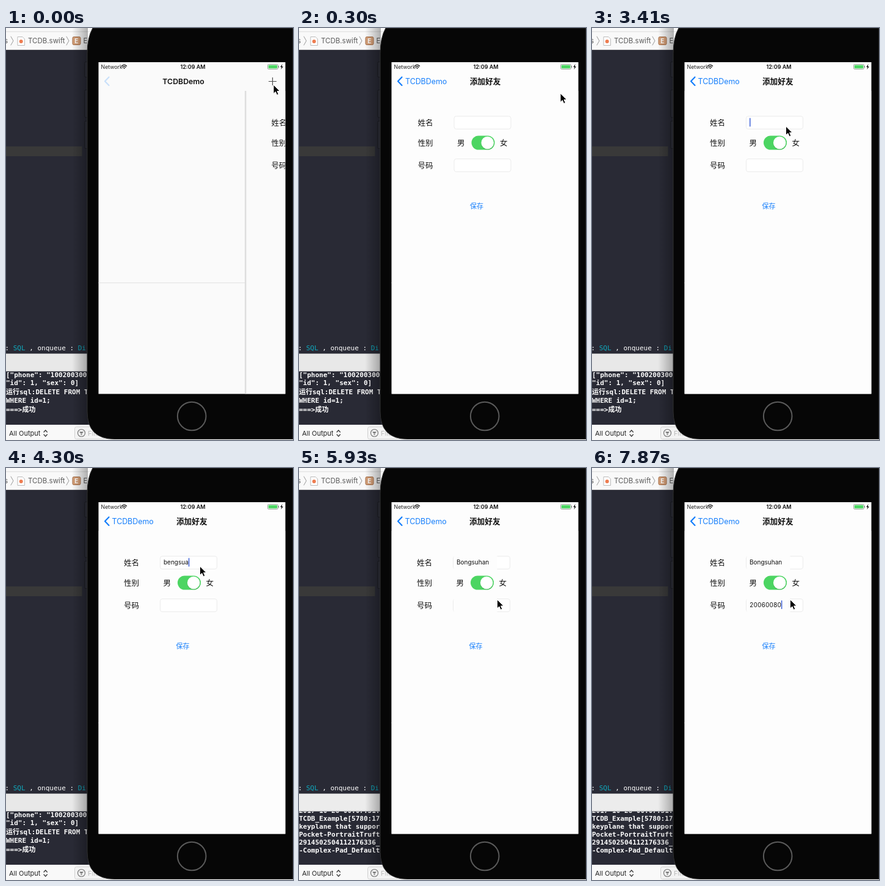
Write an HTML page that moves like this. It is 470 px wide and 675 px high and loops after 8 s.

```html
<!DOCTYPE html>
<html lang="zh-CN">
<head>
<meta charset="utf-8">
<title>Add friend form</title>
<style>
  html, body { margin: 0; width: 100%; height: 100%; overflow: hidden; background: #292a35; }
  svg { display: block; width: 470px; height: 675px; }
  text { font-family: Inter, "Noto Sans CJK SC", "Noto Sans CJK", sans-serif; white-space: pre; }
  .mono { font: 11px "DejaVu Sans Mono", "Noto Sans CJK SC", "Noto Sans CJK", monospace; fill: #fff; }
  .log text { font-weight: 700; }
  .cyan { fill: #10a9bd; }
  .label { font-size: 12.5px; fill: #111; }
  .title { font-size: 12.3px; font-weight: 600; fill: #111; }
  .input { font-size: 10px; fill: #111; font-variant-numeric: tabular-nums; }
  .crumb { font-size: 11.5px; fill: #5c5c5c; }
  .blue { fill: #157efb; }
  .line { fill: none; stroke-linecap: round; stroke-linejoin: round; }
</style>
</head>
<body>
<svg viewBox="0 0 470 675">
  <defs>
    <linearGradient id="shade">
      <stop offset="0" stop-opacity="0"/>
      <stop offset=".45" stop-opacity=".13"/>
      <stop offset="1" stop-opacity=".3"/>
    </linearGradient>
    <clipPath id="screen"><rect x="151.5" y="56" width="306" height="543.5"/></clipPath>
    <clipPath id="content"><rect x="151.5" y="103" width="306" height="496.5"/></clipPath>
    <clipPath id="console"><rect y="563" width="140" height="87"/></clipPath>
  </defs>

  <!-- editor window -->
  <rect width="470" height="675" fill="#292a35"/>
  <rect width="160" height="36" fill="#f9f9f9"/>
  <rect y="5.5" width="160" height="1" fill="#dcdcdc"/>
  <rect y="35" width="160" height="1" fill="#cfcfcf"/>
  <text class="crumb" x="-3" y="25">s</text>
  <path class="line" d="M8 14l4 7-4 7M99 14l4 7-4 7" stroke="#999"/>
  <path d="M19 14.500h8l3.500 3.500v10.500h-11.500z" fill="#fff" stroke="#bbb"/>
  <circle cx="24.700" cy="22" r="3" fill="#ee7c50"/>
  <text class="crumb" x="36" y="25">TCDB.swift</text>
  <rect x="109" y="14.500" width="13" height="13" rx="2" fill="#d5a079" stroke="#a9734e"/>
  <text x="112.300" y="25" font-size="10" font-weight="700" fill="#fff">E</text>
  <text class="crumb" x="126.500" y="25">E</text>
  <rect y="194" width="124.500" height="16" fill="#393939"/>
  <text class="mono" x="-1.500" y="528">: <tspan class="cyan">SQL</tspan> , onqueue : <tspan class="cyan">Di</tspan></text>
  <rect id="bar" y="533.500" width="160" height="29"/>
  <g class="log" clip-path="url(#console)">
    <g id="logA">
      <text class="mono" y="572">["phone": "100200300</text>
      <text class="mono" y="585">"id": 1, "sex": 0]</text>
      <text class="mono" y="600">运行sql:DELETE FROM T</text>
      <text class="mono" y="614">WHERE id=1;</text>
      <text class="mono" y="629">===&gt;成功</text>
    </g>
    <g id="logB">
      <text class="mono" y="565">2017-10-26 00:07:51.</text>
      <text class="mono" y="578">TCDB_Example[5780:17</text>
      <text class="mono" y="591">keyplane that suppor</text>
      <text class="mono" y="604">Pocket-PortraitTruft</text>
      <text class="mono" y="617">2914502504112176336_</text>
      <text class="mono" y="630">-Complex-Pad_Default</text>
    </g>
  </g>
  <rect y="650" width="470" height="25" fill="#f9f9f9"/>
  <text x="5" y="668" font-size="11" fill="#222">All Output</text>
  <path class="line" d="M62 662l2.700-3 2.700 3M62 666l2.700 3 2.700-3" stroke="#333" stroke-width="1.200"/>
  <rect x="112.500" y="653.500" width="380" height="20" rx="3" fill="#f3f3f3" stroke="#d2d2d2"/>
  <circle cx="123.500" cy="663.500" r="6" fill="none" stroke="#777" stroke-width="1.200"/>
  <path d="M120 661.500h7l-2.500 3h-2z M122.500 665.500h2v1.500h-2z" fill="#777"/>
  <text x="134" y="668" font-size="11" fill="#bdbdbd">Filter</text>

  <!-- phone -->
  <rect x="108" width="26" height="650" fill="url(#shade)"/>
  <g fill="#22232a" stroke="#16171c">
    <rect x="128.500" y="55.500" width="8" height="25" rx="2"/>
    <rect x="128.500" y="101.500" width="8" height="45" rx="2"/>
    <rect x="128.500" y="152.500" width="8" height="45" rx="2"/>
  </g>
  <path d="M142 0Q133 16 133 42V628Q133 673.500 178 673.500H470V0Z" fill="#060606" stroke="#303030"/>
  <circle cx="304.200" cy="636" r="23.300" fill="none" stroke="#5a5a5a" stroke-width="2"/>

  <g clip-path="url(#screen)">
    <rect id="back" x="151" y="56" width="307" height="544"/>
    <g id="list">
      <rect x="151" y="417" width="306" height="1" fill="#e2e2e2"/>
    </g>

    <g clip-path="url(#content)">
      <g id="page">
        <rect id="sheet" x="151" y="103" width="310" height="500"/>
        <rect id="edge" x="149.500" y="103" width="2.500" height="500" fill="#dedede"/>
        <text class="label" x="193" y="160">姓名</text>
        <text class="label" x="193" y="192.500">性别</text>
        <text class="label" x="193" y="229.500">号码</text>
        <g fill="#fff" stroke="#ebebeb">
          <rect x="252.500" y="144.500" width="93" height="21" rx="3.500"/>
          <rect x="252.500" y="214.500" width="93" height="21" rx="3.500"/>
        </g>
        <g id="wipe" fill="#fdfdfd">
          <rect x="253.500" y="143" width="71" height="24"/>
          <rect x="253.500" y="213" width="71" height="24"/>
        </g>
        <text class="label" x="257.500" y="192.500">男</text>
        <text class="label" x="327.500" y="192.500">女</text>
        <rect x="281" y="176.500" width="38" height="23" rx="11.500" fill="#4cd562"/>
        <circle cx="307.200" cy="189" r="10.500" fill="#000" opacity=".13"/>
        <circle cx="307.200" cy="188" r="10.300" fill="#fff"/>
        <text class="blue" x="278.500" y="296" font-size="11">保存</text>

        <rect id="mark" x="256" y="147.500" width="50" height="14.500" fill="#c8dcf1"/>
        <text id="name" class="input" x="258" y="158.300"></text>
        <text id="phone" class="input" x="258" y="228"></text>
        <g id="hint">
          <path d="M256.500 162.500H318a8 8 0 0 1 0 16H256.500Z" fill="#fff" stroke="#cacaca"/>
          <text x="258" y="174.300" font-size="10" fill="#2c78cf">Bongsuhan</text>
          <path class="line" d="M315 168l5 5m0-5l-5 5" stroke="#aaa"/>
        </g>
        <rect id="caret" width="1.500" height="14" fill="#3f62d8"/>
      </g>
    </g>

    <!-- status and navigation bars -->
    <text x="155.500" y="66.700" font-size="8.800" fill="#222">Network</text>
    <path class="line" d="M189.500 62.300q4-3.800 8 0M191 64.300q2.500-2.300 5 0" stroke="#111" stroke-width="1.300"/>
    <circle cx="193.500" cy="66" r="1" fill="#111"/>
    <text x="306" y="66.800" font-size="9" font-weight="600" text-anchor="middle" fill="#111">12:09 AM</text>
    <rect x="428.500" y="59.500" width="17" height="8" rx="1.800" fill="#fff" stroke="#8a8a8a" stroke-width=".8"/>
    <rect x="429.700" y="60.700" width="14.600" height="5.600" rx=".8" fill="#4cd562"/>
    <path d="M446.600 62v3" stroke="#8a8a8a"/>
    <path d="M452.500 59l-3.300 5h2l-.8 4 3.400-5h-2z" fill="#111"/>

    <path id="chevron" class="line" d="M168.500 80.500l-6.500 6.700 6.500 6.700" stroke="#157efb" stroke-width="2.200"/>
    <text id="oldTitle" class="title" y="91.500">TCDBDemo</text>
    <text id="backTitle" class="blue" y="91.500" font-size="12.400">TCDBDemo</text>
    <text id="newTitle" class="title" y="92" text-anchor="middle" style="font-size:12.700px">添加好友</text>
    <path id="plus" d="M430 87.500h13M436.500 81v13" stroke="#222" stroke-width="1.200"/>
  </g>

  <path id="mouse" d="M0 0V14.500L3.400 11.400 5.700 16.700 8.300 15.600 6 10.500H10.500Z" fill="#000" stroke="#fff" stroke-width="1"/>
</svg>
<script>
const LOOP = 8000;
const $ = id => document.getElementById(id);
const set = (id, attrs) => {
  for (const key in attrs) $(id).setAttribute(key, attrs[key]);
};
const show = (id, on) => set(id, { visibility: on ? 'visible' : 'hidden' });
const clamp = v => Math.max(0, Math.min(1, v));

// Each track holds [time, ...values]; a value stays until the next key.
const at = (track, t) => track.reduce((now, key) => key[0] <= t ? key : now).slice(1);

const slide = [[0, 241.5], [150, 22], [300, 1.5], [450, 0]];
const mouse = [
  [0, 438, 93], [150, 436, 96], [300, 428, 107], [450, 415, 132], [600, 395, 172],
  [750, 372, 222], [900, 352, 275], [1050, 340, 311], [1500, 322.5, 275],
  [1640, 321, 238], [1790, 318.5, 190], [1930, 317.5, 161],
  [4600, 318.5, 170], [4750, 321, 190], [4890, 324, 209], [5040, 324.5, 215.5]
];
const blink = [
  [0, 0], [2380, 1], [2820, .55], [2970, .2], [3120, 0], [3410, 1], [4750, 0],
  [5480, 1], [5780, .45], [5930, 0], [6380, 1]
];
const nameKeys = [[0, 0], [3560, 1], [3710, 2], [3860, 3], [4010, 4], [4150, 5], [4300, 7], [4450, 8]];
const phoneKeys = [
  [0, 0], [6380, 1], [6530, 2], [6680, 3], [6980, 4], [7130, 5], [7280, 6], [7730, 7], [7870, 8]
];

function drawPush(t) {
  const [x] = at(slide, t);
  const q = x / 306;
  const paper = q > .5 ? '#fafafa' : '#fdfdfd';
  set('back', { fill: paper });
  set('sheet', { fill: paper });
  set('page', { transform: `translate(${x})` });
  set('list', { transform: `translate(${-92 * (1 - q)})` });
  show('edge', x > 2);
  set('chevron', { opacity: clamp(1 - q) });
  set('oldTitle', { x: 173.5 + 105 * q, opacity: q < .02 ? 0 : clamp(q * 1.5) });
  set('backTitle', { x: 173.5 + 105 * q, opacity: clamp(1 - q * 2) });
  set('newTitle', { x: 304.3 + 150 * q, opacity: clamp(1 - q * 1.3) });
  set('plus', { opacity: q < .02 ? 0 : Math.min(.8, q * 1.1) });
}

function drawForm(t) {
  const accepted = t >= 5330;
  const suggesting = t >= 4750 && !accepted;
  $('name').textContent = accepted ? 'Bongsuhan' : 'bengsuan'.slice(0, at(nameKeys, t)[0]);
  $('phone').textContent = '20060080'.slice(0, at(phoneKeys, t)[0]);
  show('mark', suggesting);
  show('hint', suggesting);
  show('wipe', accepted);
  show('logA', !accepted);
  show('logB', accepted);
  set('bar', { fill: accepted ? '#ececec' : '#e8e8e8' });
  const field = $(accepted ? 'phone' : 'name');
  const width = field.textContent ? field.getComputedTextLength() : 0;
  set('caret', { x: 258 + width, y: accepted ? 217 : 147.5, opacity: at(blink, t)[0] });
}

const start = performance.now();
function frame() {
  const t = (performance.now() - start) % LOOP;
  drawPush(t);
  drawForm(t);
  set('mouse', { transform: `translate(${at(mouse, t)})` });
  requestAnimationFrame(frame);
}
frame();
</script>
</body>
</html>
```
